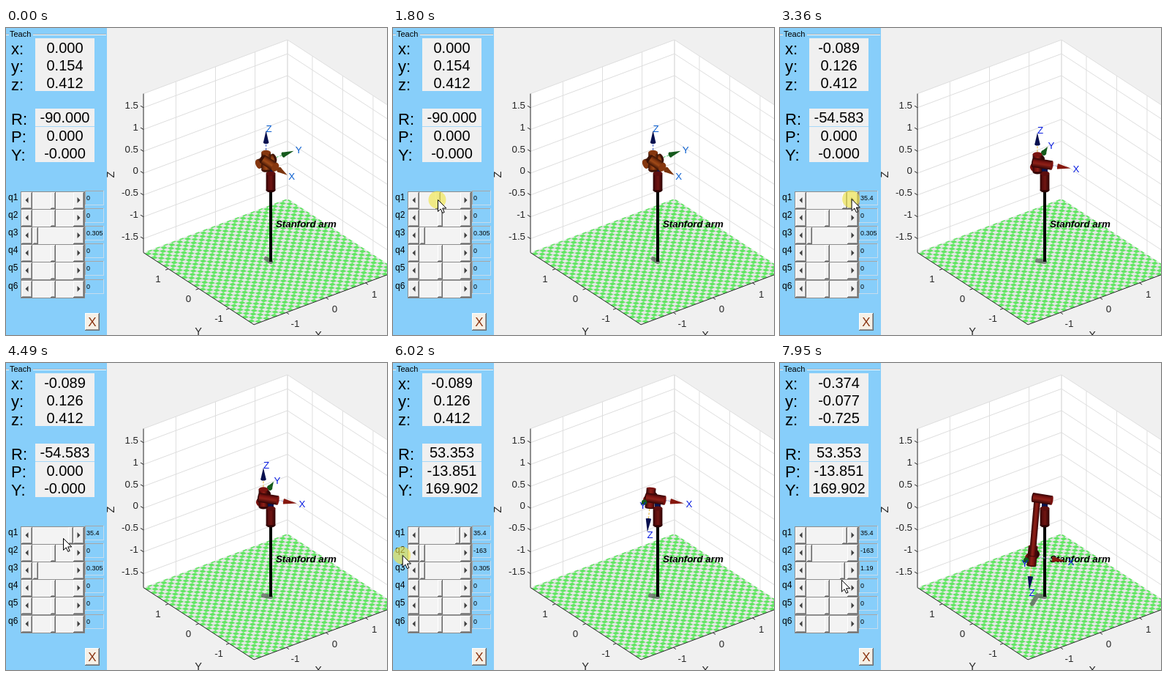
An HTML page with a canvas for the animation above (8000 ms loop, 521 by 419 pixels).

```html
<!DOCTYPE html>
<html lang="en">
<head>
<meta charset="utf-8">
<title>Arm teach panel</title>
<style>
html, body { margin: 0; width: 100%; height: 100%; overflow: hidden; background: #f0f0f0; }
canvas { display: block; }
</style>
</head>
<body>
<canvas id="stage" width="521" height="419"></canvas>
<script>
const LOOP = 8000, FPS = 15, LIM = 1.82, RAD = Math.PI / 180;
const FONT = '"Liberation Sans", Arial, sans-serif';
const CAM = [-0.53, -0.69, 0.49];
const ctx = document.getElementById('stage').getContext('2d');
let g = ctx;

// time, x, y of the pointer tip
const POINTER = [
  [60, 540, 419], [660, 60, 234], [1330, 60, 234], [1400, 64, 234], [1730, 64, 234],
  [1800, 61, 234], [2400, 12.5, 234], [2730, 12.5, 234], [3360, 98, 233], [3500, 98, 233],
  [3820, 111, 264], [4000, 106, 268], [4360, 78, 238], [4490, 78, 239], [4630, 81, 242],
  [4760, 81, 242], [4960, 66, 260], [5620, 37, 262], [6020, 12.5, 262], [6360, 12.5, 262],
  [6680, 38, 281], [6960, 38, 281], [7680, 83, 288], [7880, 83, 288], [7950, 84, 297], [8000, 84, 297]
];
// press, release, fade length
const PRESSES = [[800, 930, 200], [1590, 3500, 220], [4900, 6360, 250], [6820, 7870, 50]];

const clamp = (v, a, b) => Math.min(b, Math.max(a, v));
const proj = ([x, y, z]) => [362 + 54.1 * x - 41.5 * y, 210.5 - 20.2 * x - 27 * y - 59.6 * z];
const add = (p, d, k) => p.map((v, i) => v + d[i] * k);
const depth = p => p.reduce((s, v, i) => s + v * CAM[i], 0);

function box(x, y, w, h, fill) {
  g.fillStyle = fill;
  g.fillRect(x, y, w, h);
}
function poly(pts, fill) {
  g.beginPath();
  pts.forEach(p => g.lineTo(p[0], p[1]));
  g.closePath();
  g.fillStyle = fill;
  g.fill();
}
function line(pts, color, width = 1) {
  g.beginPath();
  pts.forEach(p => g.lineTo(p[0], p[1]));
  g.strokeStyle = color;
  g.lineWidth = width;
  g.stroke();
}
function text(s, x, y, size, color = '#000', align = 'left', style = '') {
  g.font = `${style} ${size}px ${FONT}`;
  g.fillStyle = color;
  g.textAlign = align;
  g.textBaseline = 'alphabetic';
  g.fillText(s, x, Math.round(y + size * 0.36));
}
function bevel(x, y, w, h, fill = '#f0f0f0') {
  box(x, y, w, h, '#696969');
  box(x, y, w - 1, h - 1, '#fff');
  box(x + 1, y + 1, w - 2, h - 2, '#a0a0a0');
  box(x + 1, y + 1, w - 3, h - 3, fill);
}

function drawFloor() {
  const quad = (x, y, s) => [[x, y], [x + s, y], [x + s, y + s], [x, y + s]].map(c => proj([...c, -LIM]));
  g.save();
  const edge = quad(-LIM, -LIM, 2 * LIM);
  poly(edge, '#e6e6e6');
  g.clip();
  for (let i = 0; i < 37; i++)
    for (let j = 1 - i % 2; j < 37; j += 2)
      poly(quad(-LIM + i * 0.1, -LIM + j * 0.1, 0.1), '#62e664');
  g.restore();
}

function drawAxes() {
  const L = LIM, ink = '#262626', grid = '#dedede';
  const seg = (a, b, color) => line([proj(a), proj(b)], color);
  poly([[-L, L, -L], [-L, L, L], [L, L, L], [L, L, -L]].map(proj), '#fff');
  poly([[L, L, -L], [L, L, L], [L, -L, L], [L, -L, -L]].map(proj), '#fff');
  drawFloor();
  for (const v of [-1, 0, 1, L]) {
    seg([v, L, -L], [v, L, L], grid);
    seg([L, v, -L], [L, v, L], grid);
  }
  for (const v of [-1.5, -1, -0.5, 0, 0.5, 1, 1.5, L]) {
    seg([-L, L, v], [L, L, v], grid);
    seg([L, L, v], [L, -L, v], grid);
    if (v === L) continue;
    const p = proj([-L, L, v]);
    line([p, [p[0] - 4, p[1] - 2.5]], ink);
    text(String(v), 181, p[1] - 3.5, 13.3, ink, 'right');
  }
  line([[-L, L, L], [-L, L, -L], [-L, -L, -L], [L, -L, -L]].map(proj), ink);
  for (const v of [-1, 0, 1]) {
    const a = proj([v, -L, -L]), b = proj([-L, v, -L]);
    line([a, [a[0] + 3.5, a[1] + 2.3]], ink);
    line([b, [b[0] - 4, b[1] + 1.5]], ink);
    text(String(v), a[0] + 12, a[1] + 15, 13.3, ink, 'center');
    text(String(v), b[0] - 14, b[1] + 13.5, 13.3, ink, 'center');
  }
  text('Y', 263, 414, 14.5, ink, 'center');
  text('X', 427, 419, 14.5, ink, 'center');
  g.save();
  g.translate(143, 200);
  g.rotate(-Math.PI / 2);
  text('Z', 0, 0, 14.5, ink, 'center');
  g.restore();
}

function drawPanel() {
  box(0, 0, 138, 419, '#87cefa');
  box(0, 8, 137, 1, '#a3b4c0');
  box(0, 9, 137, 1, '#f0f8ff');
  box(4, 2, 33, 12, '#87cefa');
  text('Teach', 5, 8, 11);
  [...'xyzRPY'].forEach((c, i) => {
    const y = i < 3 ? 28 + 24.3 * i : 124 + 24.4 * (i - 3);
    text(c + ':', 7, y, 22);
  });
  box(40, 14, 81, 72, '#f0f0f0');
  box(40, 110, 81, 73, '#f0f0f0');
  box(40, 134, 81, 1, '#a6d8f8');
  for (let i = 0; i < 6; i++) {
    const y = 223 + 24.2 * i | 0;
    text('q' + (i + 1), 3, y + 8, 12);
    box(20, y, 88, 25, '#8d8d8d');
    box(36, y + 1, 57, 23, '#f3f3f3');
    for (const x of [21, 92]) {
      bevel(x, y + 1, 15, 23);
      const d = x < 50 ? -2 : 2, m = x + 7.5, c = y + 12;
      poly([[m + d, c], [m - d, c - 4], [m - d, c + 4]], '#404040');
    }
    box(108, y - 1, 26, 20, '#a9a6a4');
    box(109, y, 24, 18, '#87cefa');
    box(133, y - 1, 1, 20, '#c6dced');
    box(108, y + 18, 26, 1, '#c6dced');
  }
  bevel(108, 389, 20, 24, '#f6f0e6');
  text('X', 118, 401, 17, '#8a3410', 'center');
}

function cylinder(a, b, r, tones) {
  const A = proj(a), B = proj(b), d = b.map((v, i) => v - a[i]);
  const dx = B[0] - A[0], dy = B[1] - A[1], len = Math.hypot(dx, dy) || 1;
  const nx = -dy / len * r, ny = dx / len * r;
  const k = depth(d) / Math.hypot(...d), ang = Math.atan2(dy, dx);
  const [near, far] = k > 0 ? [B, A] : [A, B];
  const cap = (p, fill) => {
    g.beginPath();
    g.ellipse(p[0], p[1], Math.abs(k) * r, r, ang, 0, 7);
    g.fillStyle = fill;
    g.fill();
  };
  const shade = g.createLinearGradient(A[0] - nx, A[1] - ny, A[0] + nx, A[1] + ny);
  [tones[0], tones[1], tones[2], tones[0]].forEach((c, i) => shade.addColorStop([0, 0.3, 0.55, 1][i], c));
  cap(far, tones[0]);
  poly([[A[0] - nx, A[1] - ny], [B[0] - nx, B[1] - ny], [B[0] + nx, B[1] + ny], [A[0] + nx, A[1] + ny]], shade);
  cap(near, tones[1]);
}

function shaft(o, dir, color) {
  g.setLineDash([3, 2]);
  line([proj(o), proj(add(o, dir, 0.45))], color);
  g.setLineDash([]);
}

function cone(o, dir, color) {
  const B = proj(add(o, dir, 0.43)), C = proj(add(o, dir, 0.7));
  const dx = C[0] - B[0], dy = C[1] - B[1], len = Math.hypot(dx, dy) || 1;
  const nx = -dy / len * 3.7, ny = dx / len * 3.7;
  g.beginPath();
  g.ellipse(B[0], B[1], 3.7 * Math.abs(depth(dir)), 3.7, Math.atan2(dy, dx), 0, 7);
  g.fillStyle = color;
  g.fill();
  poly([[B[0] + nx, B[1] + ny], C, [B[0] - nx, B[1] - ny]], color);
}

// Tool position and axes from the joint values
function pose(q1, q2, q3) {
  const c1 = Math.cos(q1 * RAD), s1 = Math.sin(q1 * RAD), c2 = Math.cos(q2 * RAD), s2 = Math.sin(q2 * RAD);
  const X = [s1, -c1, 0], Y = [c1 * c2, s1 * c2, -s2], Z = [c1 * s2, s1 * s2, c2];
  const elbow = [-0.154 * s1, 0.154 * c1, 0.412];
  return {
    X, Y, Z, elbow, tool: add(elbow, Z, q3),
    rpy: [Math.atan2(-Y[0], X[0]), Math.asin(Z[0]), Math.atan2(-Z[1], Z[2])].map(v => v / RAD)
  };
}

function drawArm(p, q3, fresh) {
  const red = ['#300405', '#7a1310', '#8e2118'];
  const skin = fresh ? ['#3c1204', '#85370f', '#a04a18'] : red;
  const shoulder = [0, 0, 0.412], base = [0, 0, -LIM];
  const flat = v => proj([v[0], v[1], -LIM]);
  g.lineCap = g.lineJoin = 'round';
  line([proj(base), flat(p.elbow), flat(p.tool)], 'rgba(95,95,95,.75)', 6);
  g.lineCap = 'butt';
  line([proj(base), proj([0, 0, 0])], '#000', 4);
  text('Stanford arm', 369, 267.5, 13.3, '#000', 'left', 'italic bold');
  line([proj([0, 0, 0]), proj(shoulder)], '#06144f', 8);
  cylinder([0, 0, -0.18], [0, 0, 0.2], 6.4, ['#2c0304', '#5d0e0e', '#6f1512']);

  const parts = [];
  const part = (at, draw) => parts.push([depth(at), draw]);
  const joint = (c, axis) =>
    part(c, () => cylinder(add(c, axis, -0.2), add(c, axis, 0.2), 6.4, skin));
  joint(add(shoulder, p.X, -0.05), p.X);
  joint(p.tool, p.Y);
  joint(p.tool, p.Z);
  if (q3 > 0) part(add(p.elbow, p.Z, q3 / 2), () => cylinder(p.elbow, p.tool, 4.4, red));
  const tint = { X: fresh ? '#7b340c' : '#86180f', Y: '#155a1c', Z: '#08104f' };
  const wire = { X: fresh ? '#c06030' : '#9a9ad8', Y: '#45c060', Z: fresh ? '#3050c0' : '#e0b030' };
  for (const k of 'XYZ') {
    shaft(p.tool, p[k], wire[k]);
    part(add(p.tool, p[k], 0.45), () => cone(p.tool, p[k], tint[k]));
  }
  parts.sort((a, b) => a[0] - b[0]).forEach(s => s[1]());
  for (const k of 'XYZ') {
    const at = proj(add(p.tool, p[k], 0.75));
    text(k, at[0] + 4, at[1], 13.3, fresh ? '#0a5fd0' : '#0a1ee0', 'center');
  }
}

function pointerAt(t) {
  let i = 0;
  while (i < POINTER.length - 2 && t >= POINTER[i + 1][0]) i++;
  const a = POINTER[i], b = POINTER[i + 1];
  const u = clamp((t - a[0]) / (b[0] - a[0]), 0, 1), e = u * u * (3 - 2 * u);
  return [a[1] + (b[1] - a[1]) * e, a[2] + (b[2] - a[2]) * e];
}

function drawPointer(t) {
  const [x, y] = pointerAt(t);
  for (const [on, off, fade] of PRESSES) {
    const a = t < on ? 0 : clamp(1 - (t - off) / fade, 0, 1);
    if (!a) continue;
    g.beginPath();
    g.arc(x - 0.5, y + 0.5, 12, 0, 7);
    g.fillStyle = `rgba(240,228,70,${0.64 * a})`;
    g.fill();
  }
  const shape = [[0, 0], [0, 16], [3.7, 12.5], [6.3, 18], [8.7, 17], [6.2, 11.5], [11.3, 11.5]]
    .map(p => [x + p[0] + 0.5, y + p[1] + 0.5]);
  poly(shape, '#fff');
  line([...shape, shape[0]], '#000');
}

// Each thumb follows the pointer while its drag lasts
const thumb = (t, from, to, rest, grab) =>
  t < from ? rest : clamp(rest + pointerAt(Math.min(t, to))[0] - grab, 37, 85);

function short(v) {
  return String(+v.toPrecision(3));
}

const backdrop = document.createElement('canvas');
backdrop.width = 521;
backdrop.height = 419;
g = backdrop.getContext('2d');
box(0, 0, 521, 419, '#f0f0f0');
drawAxes();
drawPanel();
g = ctx;

function render(time) {
  const t = Math.floor((time % LOOP + 5) * FPS / 1000) * 1000 / FPS;
  const t1 = thumb(t, 1790, 3400, 61, 64), t2 = thumb(t, 4960, 6100, 61, 66), t3 = thumb(t, 6980, 7800, 37, 38);
  const moved = t > 1820;
  const q1 = moved ? (t1 - 61) / 24 * (t1 < 61 ? 134.583 : 35.417) : 0;
  const q2 = (t2 - 61) / 24 * 162.917;
  const q3 = 0.305 + (t3 - 37) / 45 * 0.8845;
  const reach = t > 7040 ? q3 : 0;
  const p = pose(q1, q2, reach);

  g.drawImage(backdrop, 0, 0);
  drawArm(p, reach, !moved);
  [...p.tool, ...p.rpy].forEach((v, i) => {
    const y = i < 3 ? 27 + 23.7 * i : 122 + 24.3 * (i - 3);
    text((i === 5 && !v ? -1e-9 : v).toFixed(3), 80.5, y, 20, '#000', 'center');
  });
  [t1, t2, t3, 61, 61, 61].forEach((x, i) => {
    const y = 223 + 24.2 * i | 0;
    bevel(Math.round(x), y + 1, 7, 23);
    text([short(q1), short(q2), short(q3), '0', '0', '0'][i], 110, y + 9, 9);
  });
  drawPointer(t);
}

const start = performance.now();
(function tick() {
  render(performance.now() - start);
  requestAnimationFrame(tick);
})();
</script>
</body>
</html>
```
